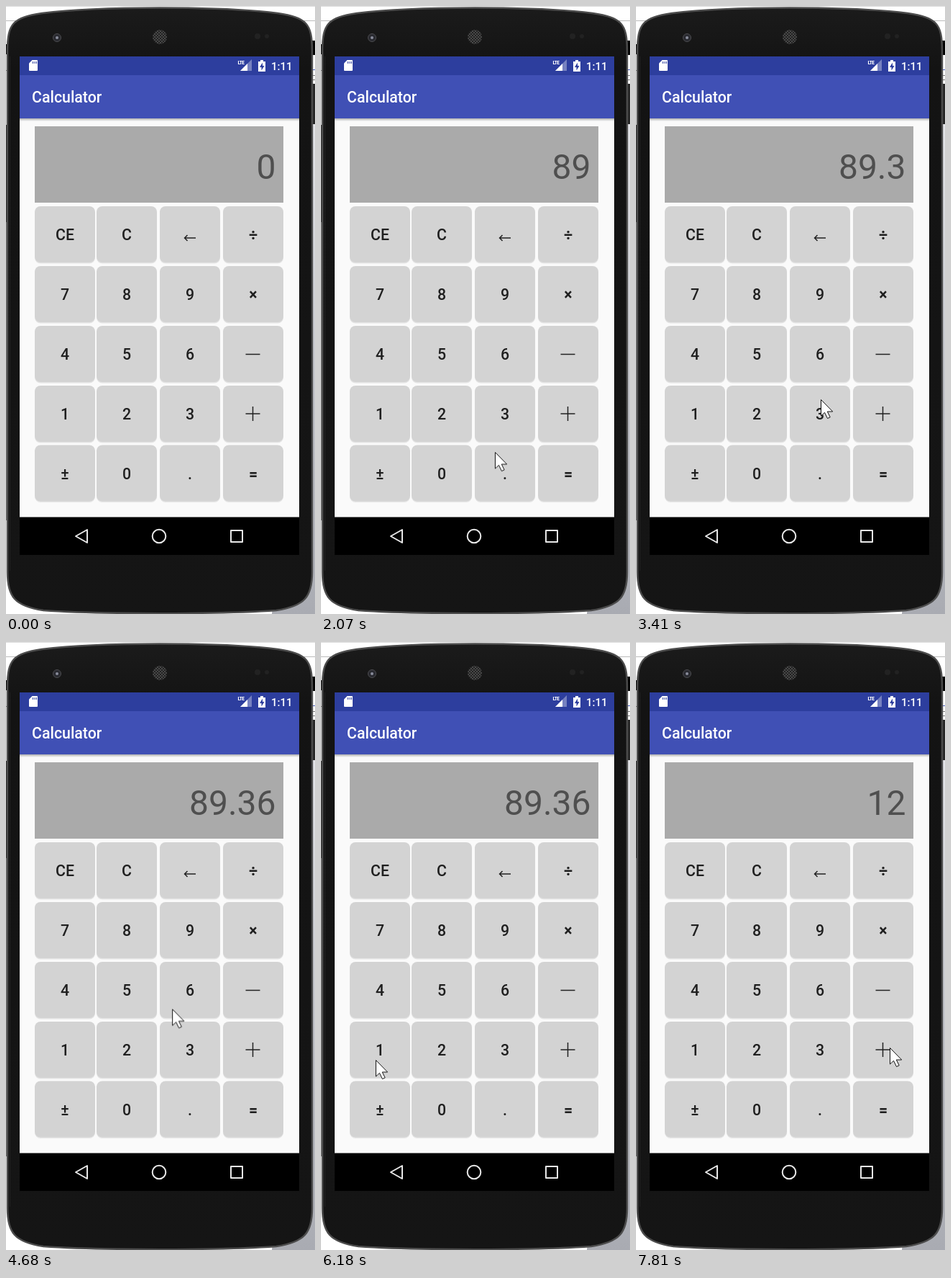
Animation of 430x844 px, one loop 8 s. Source, as an HTML page:

```html
<!DOCTYPE html>
<html lang="en">
<head>
<meta charset="utf-8">
<title>Calculator</title>
<style>
html, body { margin: 0; width: 100%; height: 100%; overflow: hidden; background: #fff; }
svg { display: block; width: 430px; height: 844px; font-family: Roboto, sans-serif; font-weight: 500; }
.key rect { fill: #d3d3d3; }
.key .shade { fill: #000; opacity: .09; }
.key text { font-size: 21.3px; fill: #1f1f1f; text-anchor: middle; }
.key path { fill: none; stroke: #222; stroke-width: 1.5; }
.value { font-size: 48px; font-weight: 400; fill: #4f4f4f; text-anchor: end; animation: value 8s step-end infinite; }
.cursor { animation: move 8s linear infinite; }

/* Each row of values sits 200px below the last one. */
@keyframes value {
  0% { transform: translateY(0); }
  13.75% { transform: translateY(-200px); }
  18.5% { transform: translateY(-400px); }
  33.75% { transform: translateY(-600px); }
  40.5% { transform: translateY(-800px); }
  51.6% { transform: translateY(-1000px); }
  82% { transform: translateY(-1200px); }
  91.25%, 100% { transform: translateY(-1400px); }
}
@keyframes move {
  0%, .86% { transform: translate(330px, 850px); }
  .875% { transform: translate(329px, 836px); }
  4% { transform: translate(272px, 640px); }
  7.5% { transform: translate(192px, 440px); animation-timing-function: ease-out; }
  10.25%, 11.5% { transform: translate(164px, 387px); }
  13% { transform: translate(206px, 400px); animation-timing-function: ease-out; }
  16%, 18.5% { transform: translate(251px, 403px); animation-timing-function: ease-in; }
  21.4% { transform: translate(260px, 452px); }
  25.875% { transform: translate(242px, 619px); animation-timing-function: ease-out; }
  31.375%, 34.5% { transform: translate(219px, 647px); animation-timing-function: ease-in-out; }
  40% { transform: translate(257px, 560px); }
  42.625% { transform: translate(257px, 546px); animation-timing-function: ease-in-out; }
  47.625%, 50% { transform: translate(250px, 483px); }
  54.25%, 57.625% { transform: translate(232px, 493px); animation-timing-function: ease-in; }
  59.5% { transform: translate(229px, 550px); }
  61.5% { transform: translate(256px, 623px); }
  64% { transform: translate(325px, 555px); animation-timing-function: ease-out; }
  67%, 67.875% { transform: translate(350px, 428px); }
  68.5% { transform: translate(345px, 411px); animation-timing-function: ease-out; }
  70%, 72% { transform: translate(340px, 388px); animation-timing-function: ease-in; }
  74.5% { transform: translate(220px, 490px); animation-timing-function: ease-out; }
  77.875%, 78.25% { transform: translate(68px, 585px); }
  79.5%, 81.5% { transform: translate(60px, 584px); animation-timing-function: ease-in-out; }
  86.25%, 91% { transform: translate(170px, 568px); animation-timing-function: ease-in-out; }
  97.625%, 100% { transform: translate(353px, 563px); }
}
</style>
</head>
<body>
<svg viewBox="0 0 430 844">
  <defs>
    <linearGradient id="body" x2="0" y2="1">
      <stop offset="0" stop-color="#1b1b1b"/><stop offset=".1" stop-color="#131313"/><stop offset="1" stop-color="#151515"/>
    </linearGradient>
    <linearGradient id="side" x2="0" y2="1">
      <stop offset="0" stop-color="#e4e5e9"/><stop offset="1" stop-color="#a9abb2"/>
    </linearGradient>
    <linearGradient id="drop" x2="0" y2="1">
      <stop offset="0" stop-opacity=".3"/><stop offset="1" stop-opacity="0"/>
    </linearGradient>
    <pattern id="mesh" width="4" height="4" patternUnits="userSpaceOnUse">
      <circle cx="1" cy="1" r="1" fill="#555"/><circle cx="3" cy="3" r="1" fill="#555"/>
    </pattern>
    <clipPath id="panel"><path d="M40 167h346v106H40z"/></clipPath>
  </defs>

  <!-- desktop behind the phone -->
  <path d="M0 .5H430" stroke="#ddd"/>
  <path d="M0 20.5H14M414 20.5H430" stroke="#bbb"/>
  <path d="M0 53h4v14H0zM426 48h4v20h-4z"/>
  <path d="M0 89.5H4M427 96.5h3M427 102.5h3" stroke="#777"/>
  <path d="M427 88.5h3" stroke="#4a62c8"/>
  <path d="M426 164h4v680h-60z" fill="url(#side)"/>
  <path d="M426 108h4v56h-4zM0 165h4v135H0z" fill="#262626"/>
  <path d="M0 300h4v414H0z" fill="#777"/>

  <!-- phone -->
  <path d="M2 62C2 24 10 16 50 10C130 0 298 0 378 10C418 16 426 24 426 62V786C426 820 416 833 376 839C300 844.500 128 844.500 52 839C12 833 2 820 2 786Z" fill="url(#body)" stroke="#4c4c4c" stroke-width="2.500"/>
  <path d="M5.500 70V784" stroke="#222" fill="none"/>
  <circle cx="71" cy="44" r="5.500" fill="#292a30" stroke="#4b4b4e"/>
  <circle cx="71" cy="44" r="2" fill="#8a8d9c"/>
  <circle cx="214" cy="43" r="10" fill="#222"/>
  <circle cx="214" cy="43" r="10" fill="url(#mesh)"/>
  <g fill="#222"><circle cx="350" cy="42" r="4"/><circle cx="363" cy="42" r="3"/></g>

  <!-- screen -->
  <path d="M19 70h389v692H19z"/>
  <path d="M19 156h389v553.500H19z" fill="#fafafa"/>
  <path d="M19 70h389v26H19z" fill="#2d3e9e"/>
  <path d="M19 96h389v60H19z" fill="#4050b5"/>
  <path d="M19 156h389v4H19z" fill="url(#drop)"/>

  <!-- status bar -->
  <g fill="#fff">
    <path d="M36.500 75H43q1 0 1 1v13q0 1-1 1H33q-1 0-1-1V79.500z"/>
    <path d="M37.500 77v3M40 77v3M42.300 77v3" stroke="#2d3e9e"/>
    <text x="322.500" y="81" font-size="7.500" font-family="Roboto Condensed, Roboto, sans-serif" letter-spacing="-.6" font-weight="700">LTE</text>
    <path d="M326 90L342 74V90z" opacity=".35"/>
    <path d="M326 90L336 80V90z"/>
    <path d="M351 77h3v-2h4v2h3v14h-10z"/>
    <path d="M357 78.500l-4 6.500h2.500v4.500l4-6.500H357z" fill="#2d3e9e"/>
    <text x="369" y="89" font-size="15">1:11</text>
    <text x="36" y="134" font-size="21.300">Calculator</text>
  </g>

  <!-- display -->
  <path d="M40 167h346v106H40z" fill="#aaa"/>
  <g clip-path="url(#panel)"><g class="value" id="values"></g></g>

  <g id="keys"></g>

  <g fill="none" stroke="#e8e8e8" stroke-width="2" stroke-linejoin="round">
    <path d="M97 736L113 727V745z"/>
    <circle cx="213" cy="736" r="9.300"/>
    <path d="M313 728h16v16h-16z"/>
  </g>

  <path class="cursor" d="M.5 .5V23L5.500 18.300L9.500 26.500L13.200 24.800L9.300 17H16.700Z" fill="#fff" stroke="#111"/>
</svg>
<script>
const columns = [40, 126, 214, 302];
const rows = [278, 361, 444, 527, 609.5];
const labels = ['CE', 'C', '←', '÷', '7', '8', '9', '×', '4', '5', '6', '−', '1', '2', '3', '+', '±', '0', '.', '='];
const icons = {
  '←': 'M248.500 322H264M252.500 318L248.500 322L252.500 326',
  '−': 'M333.500 483.500H353.500',
  '+': 'M333.500 566H353.500M343.500 556V576'
};
const bold = '÷×=';

document.getElementById('keys').innerHTML = labels.map((label, i) => {
  const x = columns[i % 4], y = rows[Math.floor(i / 4)];
  const box = `x="${x}" width="84" height="78" rx="8"`;
  const face = icons[label]
    ? `<path d="${icons[label]}"/>`
    : `<text x="${x + 42}" y="${y + 47.2}" ${bold.includes(label) ? 'style="font-weight:700"' : ''}>${label}</text>`;
  return `<g class="key"><rect class="shade" ${box} y="${y + 1.5}"/><rect ${box} y="${y}"/>${face}</g>`;
}).join('');

document.getElementById('values').innerHTML = ['0', '8', '89', '89.', '89.3', '89.36', '1', '12']
  .map((value, i) => `<text x="375.5" y="${240 + i * 200}">${value}</text>`).join('');
</script>
</body>
</html>
```
